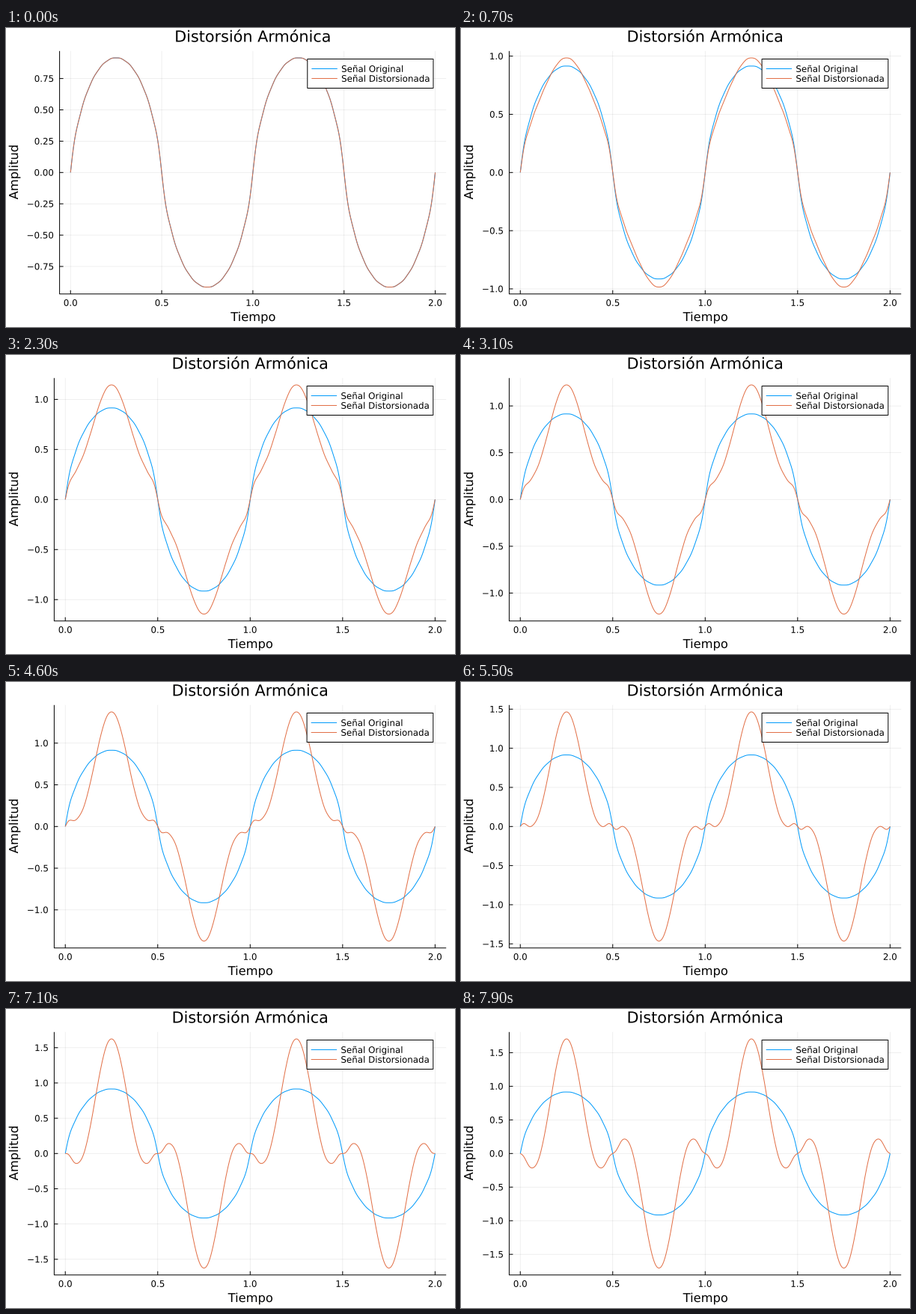
Recreate the animation shown at these times as a matplotlib script. Size 600 by 400 pixels, loop 8000 ms.

```python
import numpy as np
import matplotlib as mpl
import matplotlib.pyplot as plt
from matplotlib.animation import FuncAnimation
from matplotlib.patches import PathPatch, Rectangle
from matplotlib.textpath import TextPath
from matplotlib.transforms import Affine2D

W, H, DPI = 600, 400, 100
FRAMES, INTERVAL = 80, 100
BLUE, ORANGE = "#009AFA", "#E26F46"
TOP, BOTTOM, RIGHT = 30.8, 355.8, 588.2
PAD = 0.03
SMALL, MEDIUM, LARGE = 11.87, 16.3, 20.75

mpl.rcParams.update({
    "font.family": "DejaVu Sans",
    "path.snap": False,
    "lines.solid_capstyle": "butt",
})

t = np.linspace(0, 2, 1001)
signal = sum(np.sin(2 * np.pi * n * t) / n**2 for n in range(1, 20, 2))
third = np.sin(6 * np.pi * t)

fig = plt.figure(figsize=(W / DPI, H / DPI), dpi=DPI, facecolor="white")
ax = fig.add_axes([0, 0, 1, 1])


def line(x, y, color="black", width=1.0, **kw):
    ax.plot(x, y, color=color, lw=width * 72 / DPI, **kw)


def text(x, y, s, size, align="center", angle=0):
    """Draw outlined text with its baseline at y, free of pixel rounding."""
    path = TextPath((0, 0), s, size=size)
    box = path.get_extents()
    shift = {"left": 0, "center": (box.x0 + box.x1) / 2, "right": box.x1}[align]
    place = Affine2D().translate(-shift, 0).rotate_deg(angle).scale(1, -1).translate(x, y)
    ax.add_patch(PathPatch(place.transform_path(path), fc="black", lw=0, zorder=6))


def label(value, digits):
    return f"{value:.{digits}f}".replace("-", "\u2212")


def legend(dx):
    x0, y0, row = 402.1 + dx, 41.5, 13
    ax.add_patch(Rectangle((x0, y0), 570.8 + dx / 4 - x0, 3 * row, fc="white",
                           ec="black", lw=72 / DPI, zorder=5))
    entries = [("Señal Original", BLUE), ("Señal Distorsionada", ORANGE)]
    for i, (name, color) in enumerate(entries, 1):
        y = y0 + i * row
        line([x0 + 5.6, x0 + 40], [y, y], color, zorder=6)
        text(x0 + 45.3, y + 4.35, name, SMALL, "left")


def draw(k):
    ax.clear()
    ax.set(xlim=(0, W), ylim=(H, 0))
    ax.axis("off")

    distorted = signal - 0.01 * k * third
    limit = np.abs(distorted).max() * (1 + 2 * PAD)
    fine = limit < 1
    step, digits = (0.25, 2) if fine else (0.5, 1)
    left = 71.6 if fine else 64.4
    mid_x, mid_y = (left + RIGHT) / 2, (TOP + BOTTOM) / 2

    def px(x):
        return left + (RIGHT - left) * (x / 2 + PAD) / (1 + 2 * PAD)

    def py(y):
        return mid_y - y / limit * (BOTTOM - TOP) / 2

    grid = dict(color="black", width=0.7, alpha=0.09, zorder=1)
    for v in np.arange(0, 2.1, 0.5):
        x = px(v)
        line([x, x], [TOP, BOTTOM], **grid)
        line([x, x], [BOTTOM - 5, BOTTOM], zorder=2)
        text(x, 371.8, label(v, 1), SMALL)

    count = int(limit / step)
    for i in range(-count, count + 1):
        y = py(i * step)
        line([left, RIGHT], [y, y], **grid)
        line([left, left + 5], [y, y], zorder=2)
        text(left - 8.5, y + 4.35, label(i * step, digits), SMALL, "right")

    line([left, left, RIGHT], [TOP, BOTTOM, BOTTOM], zorder=2)
    line(px(t), py(signal), BLUE, zorder=3)
    line(px(t), py(distorted), ORANGE, zorder=4)
    legend(0.7 if fine else 0)

    text(mid_x, 18.5, "Distorsión Armónica", LARGE)
    text(mid_x, 392, "Tiempo", MEDIUM)
    text(16, mid_y, "Amplitud", MEDIUM, angle=90)
    return []


anim = FuncAnimation(fig, draw, frames=FRAMES, interval=INTERVAL,
                     init_func=lambda: [], repeat=True, repeat_delay=0)
plt.show()
```
